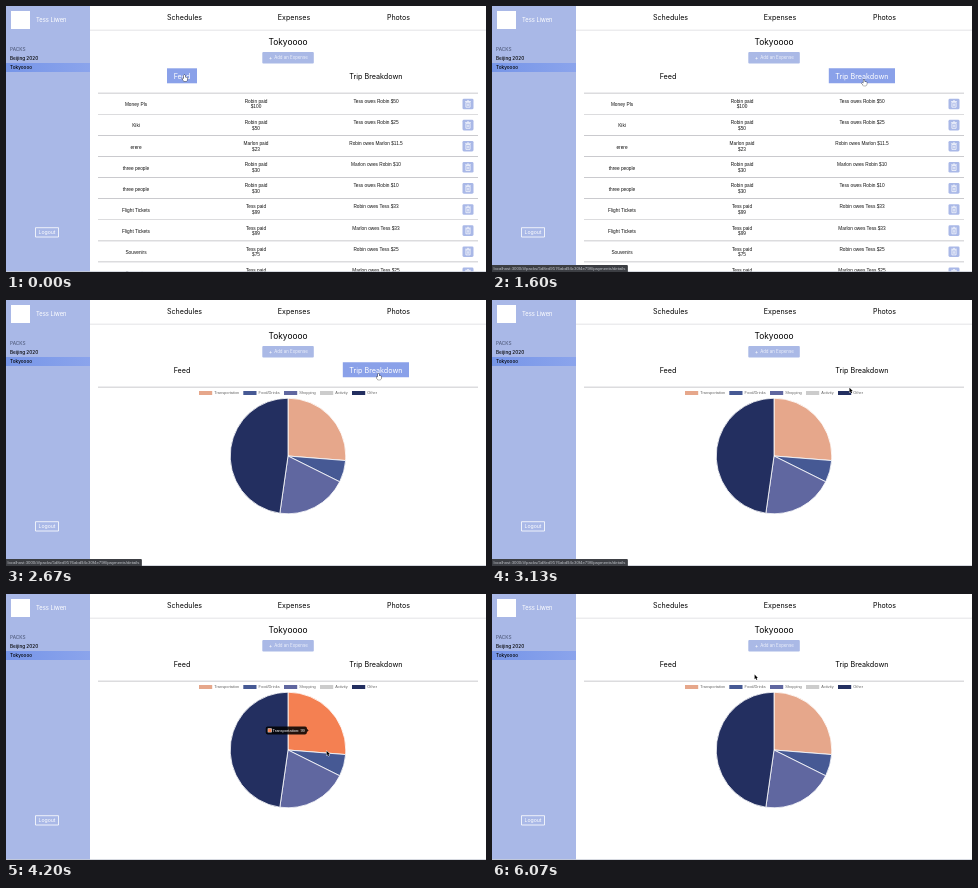
These frames come from a looping animation (480 px wide and 266 px high, 6470 ms). An HTML page with a canvas:

```html
<!DOCTYPE html>
<html lang="en">
<head>
<meta charset="utf-8">
<title>Trip expenses</title>
<style>
html, body { margin: 0; width: 100%; height: 100%; overflow: hidden; background: #fff; }
canvas { display: block; width: 480px; height: 266px; }
</style>
</head>
<body>
<canvas id="stage"></canvas>
<script>
const LOOP = 6470, W = 480, H = 266;
const canvas = document.getElementById('stage');
const dpr = window.devicePixelRatio || 1;
canvas.width = W * dpr;
canvas.height = H * dpr;
const g = canvas.getContext('2d');
const UI = 'Inter, "Open Sans", sans-serif';
const BODY = '"Liberation Sans", Arial, sans-serif';

const clamp = v => Math.max(0, Math.min(1, v));
const ramp = (t, start, len) => clamp((t - start) / len);
const outQuart = v => 1 - (1 - v) ** 4;
const lerp = (a, b, k) => a + (b - a) * k;
const mix = (a, b, k) => `rgb(${a.map((v, i) => Math.round(lerp(v, b[i], k)))})`;

function rect(x, y, w, h, fill, r = 0) {
  g.fillStyle = fill;
  g.beginPath();
  g.roundRect(x, y, w, h, r);
  g.fill();
}

function label(str, x, y, size, color = '#000', align = 'center', font = UI, weight = 400) {
  g.font = `${weight} ${size}px ${font}`;
  g.textAlign = align;
  g.textBaseline = 'alphabetic';
  g.fillStyle = color;
  g.fillText(str, x, y + size * 0.35);
}

// title, payer, amount, debtor, share
const expenses = [
  ['Money Pls', 'Robin', 100, 'Tess', 50],
  ['Kiki', 'Robin', 50, 'Tess', 25],
  ['erere', 'Marlon', 23, 'Robin', 11.5],
  ['three people', 'Robin', 30, 'Marlon', 10],
  ['three people', 'Robin', 30, 'Tess', 10],
  ['Flight Tickets', 'Tess', 99, 'Robin', 33],
  ['Flight Tickets', 'Tess', 99, 'Marlon', 33],
  ['Souvenirs', 'Tess', 75, 'Robin', 25],
  ['Souvenirs', 'Tess', 75, 'Marlon', 25]
];

const slices = [
  { name: 'Transportation', value: 99, base: [230, 167, 139], hot: [244, 128, 82], key: 193 },
  { name: 'Food/Drinks', value: 23, base: [70, 89, 148], hot: [50, 72, 165], key: 237.3 },
  { name: 'Shopping', value: 75, base: [96, 103, 160], hot: [63, 70, 168], key: 278 },
  { name: 'Activity', value: 0, base: [204, 204, 204], hot: [190, 190, 190], key: 314 },
  { name: 'Other', value: 180, base: [35, 47, 96], hot: [20, 32, 92], key: 346 }
];
const total = slices.reduce((sum, s) => sum + s.value, 0);
const pie = { x: 282, y: 156, r: 57.8, start: 2070, len: 520 };
let turn = 0;
for (const s of slices) {
  s.from = turn;
  turn += s.value / total * Math.PI * 2;
  s.to = turn;
}

const hovers = [
  { on: 3430, off: 4230, i: 0 },
  { on: 4230, off: 4600, i: 1 },
  { on: 4600, off: 5180, i: 2 },
  { on: 5180, off: 5830, i: 4 }
];
const FADE = 170;

// time, x, y of the pointer tip
const path = [
  [0, 178.5, 69], [130, 179, 69.5], [600, 179, 69.5], [900, 278, 72], [1200, 370, 70],
  [1400, 372, 73.5], [2600, 372, 73.5], [2670, 372.5, 73.5], [2800, 371, 75],
  [3100, 362, 85], [3400, 318, 112], [3600, 302.7, 123.3], [4000, 304, 127],
  [4230, 323, 161], [4600, 311, 181], [4870, 288.3, 181.5], [5180, 275, 184],
  [5400, 262, 165], [5700, 258, 130], [5850, 260.5, 98], [6000, 262.6, 80.6], [LOOP, 262.6, 80.6]
];

function pointerAt(t) {
  const n = path.findIndex(p => p[0] > t);
  const a = path[n - 1], b = path[n], k = (t - a[0]) / (b[0] - a[0]);
  return [lerp(a[1], b[1], k), lerp(a[2], b[2], k)];
}

function drawSidebar() {
  rect(0, 0, 84, H, '#a9b8e7');
  rect(5, 5, 19, 18, '#fff');
  label('Tess Liwen', 30, 14, 5.8, '#fff', 'left');
  label('PACKS', 4, 43, 4.8, '#46506f', 'left');
  const row = g.createLinearGradient(0, 0, 84, 0);
  row.addColorStop(0, '#7695e8');
  row.addColorStop(1, '#8ba4ec');
  rect(0, 57, 84, 9, row);
  label('Beijing 2020', 4, 52, 4.7, '#000', 'left', UI, 500);
  label('Tokyoooo', 4, 61.5, 4.7, '#000', 'left', UI, 500);
  g.strokeStyle = '#fff';
  g.lineWidth = 0.8;
  g.strokeRect(29.5, 221.7, 23, 9.3);
  label('Logout', 41, 226.4, 5.2, '#fff');
}

function tab(str, x, y, w, k) {
  if (k > 0) {
    g.globalAlpha = k;
    rect(x, y, w, 15, '#8aa1e9');
    g.globalAlpha = 1;
  }
  label(str, x + w / 2, 70, 7.2, mix([0, 0, 0], [255, 255, 255], k));
}

function drawHeader(t) {
  rect(84, 23.7, 396, 0.8, '#d9d9de');
  label('Schedules', 178.5, 12, 7.1);
  label('Expenses', 288, 12, 7.1);
  label('Photos', 392.5, 12, 7.1);
  label('Tokyoooo', 282, 36, 8.4);
  rect(256.3, 46, 51.5, 11.4, '#aab9e6', 1);
  label('+', 264.5, 51.6, 5.5, '#fff');
  label('Add an Expense', 285, 51.7, 4.4, '#eef1fb');
  tab('Feed', 161, 62.3, 30, 1 - ramp(t, 660, 80));
  tab('Trip Breakdown', 336.8, 62.3, 66.2, ramp(t, 1080, 80) - ramp(t, 2980, 80));
  rect(92, 86.8, 380, 0.7, '#b9b9be');
}

function trash(x, y) {
  rect(x, y, 11, 10.6, '#a9b8e7', 1.4);
  g.strokeStyle = '#fff';
  g.lineWidth = 0.7;
  g.strokeRect(x + 3.4, y + 3.6, 4.2, 4.9);
  g.beginPath();
  for (const [x1, y1, x2, y2] of [[2.6, 2.8, 8.4, 2.8], [4.6, 2, 6.4, 2], [4.8, 4.8, 4.8, 7.4], [6.2, 4.8, 6.2, 7.4]]) {
    g.moveTo(x + x1, y + y1);
    g.lineTo(x + x2, y + y2);
  }
  g.stroke();
}

function drawFeed() {
  expenses.forEach(([title, payer, sum, debtor, share], n) => {
    const y = 87.1 + n * 21.1;
    if (n) rect(92, y - 0.3, 380, 0.7, '#b9b9be');
    label(title, 130, y + 11.6, 4.75, '#111', 'center', BODY);
    label(payer + ' paid', 250, y + 8.2, 4.75, '#111', 'center', BODY);
    label('$' + sum, 250, y + 13.7, 4.75, '#111', 'center', BODY);
    label(`${debtor} owes ${payer} $${share}`, 370, y + 8.2, 4.75, '#111', 'center', BODY);
    trash(456.5, y + 5.6);
  });
}

function drawPie(t) {
  const grow = outQuart(ramp(t, pie.start, pie.len));
  slices.forEach((s, i) => {
    const color = `rgb(${s.base})`;
    rect(s.key, 91, 13.2, 4, color);
    label(s.name, s.key + 15.3, 93.1, 3.9, '#666', 'left', BODY);
    if (!s.value || !grow) return;
    const heat = hovers.reduce((k, h) => h.i === i ? k + ramp(t, h.on, FADE) - ramp(t, h.off, FADE) : k, 0);
    g.beginPath();
    g.moveTo(pie.x, pie.y);
    g.arc(pie.x, pie.y, pie.r, s.from * grow - Math.PI / 2, s.to * grow - Math.PI / 2);
    g.closePath();
    g.fillStyle = mix(s.base, s.hot, clamp(heat));
    g.fill();
    g.strokeStyle = '#fff';
    g.lineWidth = 0.8;
    g.lineJoin = 'bevel';
    g.stroke();
  });
}

function tipBox(i) {
  const s = slices[i], mid = (s.from + s.to) / 2;
  const text = `${s.name}: ${s.value}`;
  g.font = `4px ${BODY}`;
  const w = g.measureText(text).width + 8.9;
  const px = pie.x + Math.sin(mid) * pie.r / 2;
  const py = pie.y - Math.cos(mid) * pie.r / 2;
  const right = px > pie.x;
  return { text, w, right, x: right ? px - 2.3 - w : px + 2.3, y: py - 4 };
}

function drawTip(t) {
  const alpha = ramp(t, 3430, FADE) - ramp(t, 5860, 210);
  if (alpha <= 0) return;
  const n = hovers.findLastIndex(h => t >= h.on), h = hovers[n];
  const tip = tipBox(h.i), prev = n ? tipBox(hovers[n - 1].i) : tip;
  const k = outQuart(ramp(t, h.on, 200));
  const x = lerp(prev.x, tip.x, k), y = lerp(prev.y, tip.y, k), w = lerp(prev.w, tip.w, k);
  const edge = tip.right ? x + w : x, dir = tip.right ? 1.7 : -1.7;
  g.globalAlpha = alpha;
  g.fillStyle = 'rgba(0,0,0,.85)';
  g.beginPath();
  g.roundRect(x, y, w, 8, 1.8);
  g.moveTo(edge, y + 2.3);
  g.lineTo(edge + dir, y + 4);
  g.lineTo(edge, y + 5.7);
  g.fill();
  rect(x + 2, y + 2, 4, 4, '#fff');
  rect(x + 2.4, y + 2.4, 3.2, 3.2, `rgb(${slices[h.i].hot})`);
  label(tip.text, x + 6.8, y + 4.1, 4, '#fff', 'left', BODY);
  g.globalAlpha = 1;
}

function drawStatus(t) {
  const feed = ramp(t, 130, 70) - ramp(t, 800, 100);
  const trip = ramp(t, 1130, 60) - ramp(t, 3130, 100);
  const alpha = Math.max(feed, trip);
  if (alpha <= 0) return;
  const url = 'localhost:3000/#/packs/5d8ed9576abd94c30f4e798/payments' + (t > 1000 ? '/details' : '');
  g.font = `4.3px ${BODY}`;
  g.globalAlpha = alpha;
  rect(0, 259, g.measureText(url).width + 4, 7, '#3c3e43', [0, 1, 0, 0]);
  label(url, 1.5, 262.6, 4.3, '#c3c6cc', 'left', BODY);
  g.globalAlpha = 1;
}

function drawPointer(t) {
  const [x, y] = pointerAt(t);
  const onTab = (y > 62 && y < 77.5) && (x < 191 || (x > 337 && x < 403));
  const shape = onTab
    ? [[-0.5, 0], [0.4, 0], [0.6, 2.2], [2.9, 2.8], [2.7, 5], [2, 6.2], [-0.7, 6.2], [-2.2, 3.6], [-1.5, 3.1], [-0.6, 4]]
    : [[0, 0], [0, 4.6], [1.1, 3.7], [1.9, 5.4], [2.7, 5], [1.9, 3.4], [3.3, 3.3]];
  g.beginPath();
  shape.forEach(([dx, dy]) => g.lineTo(x + dx, y + dy));
  g.closePath();
  g.lineJoin = 'round';
  g.lineWidth = onTab ? 0.7 : 0.8;
  g.strokeStyle = onTab ? '#111' : '#fff';
  g.fillStyle = onTab ? '#fff' : '#000';
  g.stroke();
  g.fill();
}

function draw(t) {
  g.setTransform(dpr, 0, 0, dpr, 0, 0);
  rect(0, 0, W, H, '#fff');
  drawSidebar();
  drawHeader(t);
  if (t < pie.start) {
    drawFeed();
  } else {
    drawPie(t);
    drawTip(t);
  }
  rect(0, 265.3, W, 0.7, '#c9ccd6');
  drawStatus(t);
  drawPointer(t);
}

const begin = performance.now();
function tick() {
  draw((performance.now() - begin) % LOOP);
  requestAnimationFrame(tick);
}
tick();
</script>
</body>
</html>
```
